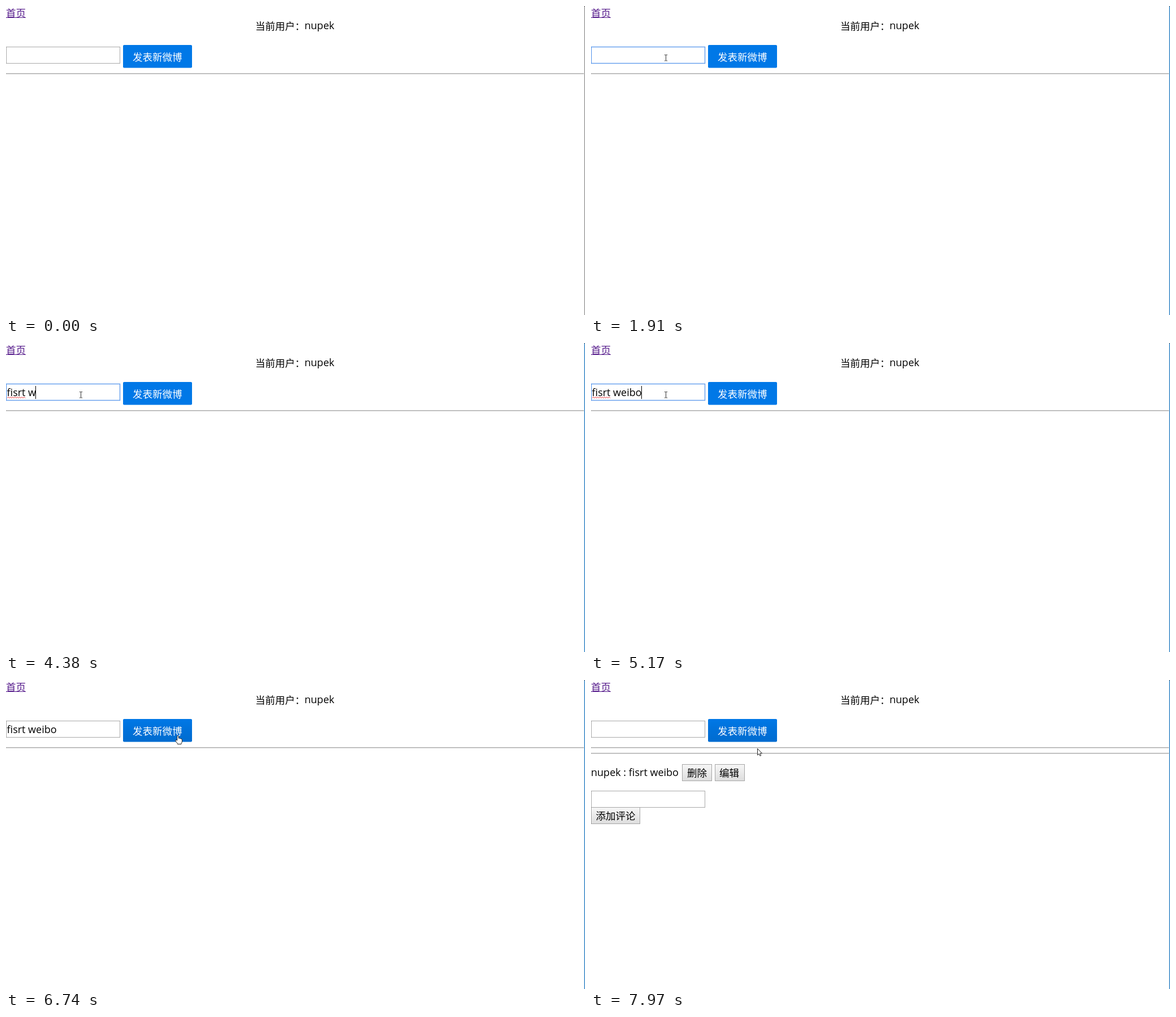
An HTML page with a canvas for the animation above (8000 ms loop, 1024 by 547 pixels).

```html
<!DOCTYPE html>
<html lang="zh-CN">
<head>
<meta charset="utf-8">
<style>
  html, body { margin: 0; width: 100%; height: 100%; overflow: hidden; background: #fff; }
  canvas { display: block; }
</style>
</head>
<body>
<canvas id="stage" width="1024" height="547"></canvas>
<script>
const ctx = document.getElementById('stage').getContext('2d');
const LOOP = 8000;
const LATIN = '18px "Open Sans", "Noto Sans", sans-serif';
const HAN = '17.5px "Noto Sans CJK SC", "Noto Sans CJK", sans-serif';
const USER = 'nupek';
const POST = 'fisrt weibo';

const FOCUS = 1370, PRESS = 6560, RELEASE = 6740, POSTED = 6880;

// [time, letters typed, caret x]
const KEYS = [
  [FOCUS, 0, 2], [2840, 1, 8], [2920, 2, 12], [3070, 3, 20], [3380, 4, 26.5],
  [3460, 5, 33], [3690, 6, 38], [4380, 7, 52], [4620, 8, 62], [4850, 9, 67],
  [5000, 10, 78], [5170, 11, 89]
];
const CARET_OFF = [[1910, 2460], [4240, 4380], [5720, 6220]];

function rect(x, y, w, h, fill) {
  ctx.fillStyle = fill;
  ctx.fillRect(x, y, w, h);
}

function text(str, x, y, font, fill = '#000') {
  ctx.font = font;
  ctx.fillStyle = fill;
  ctx.fillText(str, x, y);
}

function vertical(y, h, stops) {
  const g = ctx.createLinearGradient(0, y, 0, y + h);
  for (const [at, color] of stops) g.addColorStop(at, color);
  return g;
}

function frame(x, y, w, h, color, line = 1) {
  ctx.strokeStyle = color;
  ctx.lineWidth = line;
  ctx.strokeRect(x + 0.5, y + 0.5, w - 1, h - 1);
}

function rule(y) {
  rect(0, y, 1022, 1, '#a8a8a8');
  rect(0, y + 1, 1022, 1, '#dadada');
}

function greyButton(label, x, y, w, textX) {
  rect(x, y, w, 30, vertical(y, 30, [[0, '#f7f7f7'], [1, '#dddddd']]));
  frame(x, y, w, 30, '#a6a6a6');
  text(label, textX, y + 21.5, HAN);
}

function blueButton(t, hover) {
  ctx.beginPath();
  ctx.roundRect(207, 69, 122, 40.5, 2);
  ctx.fillStyle = '#0078e7';
  ctx.fill();
  if (hover) {
    ctx.fillStyle = vertical(69, 40.5,
      [[0, 'rgba(0,0,0,0)'], [0.4, 'rgba(0,0,0,.05)'], [1, 'rgba(0,0,0,.1)']]);
    ctx.fill();
  }
  if (t >= PRESS && t < RELEASE) {
    for (let i = 0; i < 4; i++) {
      frame(207 + i, 69 + i, 122 - 2 * i, 40.5 - 2 * i, `rgba(0,0,0,${0.2 / (i + 1)})`);
    }
  }
  text('发表新微博', 224, 96.5, HAN, '#fff');
}

function squiggle(x0, x1, y) {
  ctx.beginPath();
  for (let x = x0, i = 0; x <= x1; x += 2, i++) ctx.lineTo(x, y + (i % 2 ? -1 : 1));
  ctx.strokeStyle = '#e8262a';
  ctx.lineWidth = 1;
  ctx.stroke();
}

function inputBox(t) {
  const focused = t >= FOCUS && t < PRESS;
  if (focused) frame(0, 72, 202, 30, '#6aa2ee', 1.5);
  else frame(0, 72, 202, 30, '#a9a9a9');
  if (t < FOCUS || t >= POSTED) return;

  const [, count, caret] = KEYS.filter(k => t >= k[0]).pop();
  text(POST.slice(0, count), 1.5, 94, LATIN);
  if (!focused) return;
  if (count > 5) squiggle(2, 34, 96.5);
  if (!CARET_OFF.some(([a, b]) => t >= a && t < b)) rect(caret, 76, 1, 23, '#000');
}

function postList() {
  rule(129);
  text(USER + ' : ' + POST, 0, 170, LATIN);
  greyButton('删除', 161, 149, 53, 170);
  greyButton('编辑', 219, 149, 53, 227);
  frame(0, 196, 202, 30, '#a9a9a9');
  greyButton('添加评论', 0, 225, 87, 8.5);
}

function windowEdge(t) {
  const k = stepped(t, 1210, 1450, 3);
  const mix = (a, b) => `rgb(${a.map((v, i) => Math.round(v + (b[i] - v) * k)).join()})`;
  rect(1022, 0, 1, 547, mix([222, 222, 222], [176, 208, 234]));
  rect(1023, 0, 1, 547, mix([150, 150, 150], [45, 130, 195]));
  rect(1023, 0, 1, 1, '#222');
}

// Progress from 0 to 1 in n equal jumps
function stepped(t, from, to, n) {
  const s = Math.floor((t - from) / (to - from) * n + 1e-6);
  return Math.max(0, Math.min(n, s)) / n;
}

function pointer(t) {
  if (t < 340) return null;
  if (t < 1210) {
    const left = 1 - stepped(t, 340, 1120, 10);
    return { x: 131 + 756 * left ** 2.35, y: 92 + 444 * left ** 1.82, kind: 'arrow' };
  }
  if (t < 6030) return { x: 132, y: 91, kind: 'beam' };
  if (t < 7660) {
    const p = stepped(t, 5942, 6472, 6);
    const x = 132 + 172 * p * p * (3 - 2 * p);
    const kind = x < 202 ? 'beam' : x < 207 ? 'arrow' : 'hand';
    return { x, y: 91 + 7 * p, kind };
  }
  const p = stepped(t, 7582, 7970, 5);
  const y = 98 + 23 * p;
  return { x: 304 - 10 * p, y, kind: y < 109.5 ? 'hand' : 'arrow' };
}

const SHAPES = {
  arrow: new Path2D('M.5 .5V12L3.1 9.6L4.9 13.4L6.7 12.6L5 8.8H8.5Z'),
  hand: new Path2D('M-1.3 9V1.4Q0 -.4 1.3 1.4V5.2Q2.7 4.4 3.6 5.6Q5 5 5.7 6.3' +
    'Q7.3 6 7.4 7.6V11Q7.2 13 6 14.2V15.5H-.7V14.4L-4.3 9.8Q-4.4 7.7 -2.5 8.3Z'),
  beam: new Path2D('M-2.5 -5H-.5L0 -4.5L.5 -5H2.5M0 -4.5V4.5M-2.5 5.5H-.5L0 5L.5 5.5H2.5')
};

function drawPointer({ x, y, kind }) {
  ctx.save();
  ctx.translate(Math.round(x), Math.round(y));
  if (kind === 'beam') ctx.translate(0.5, 0.5);
  else {
    ctx.fillStyle = '#fff';
    ctx.fill(SHAPES[kind]);
  }
  ctx.strokeStyle = kind === 'beam' ? '#333' : '#222';
  ctx.lineWidth = 1;
  ctx.stroke(SHAPES[kind]);
  ctx.restore();
}

function draw(t) {
  const p = pointer(t);
  rect(0, 0, 1024, 547, '#fff');
  text('首页', 0, 18.5, HAN, '#551a8b');
  rect(0, 20, 35, 1, '#551a8b');
  text('当前用户：', 441, 41.5, HAN);
  text(USER, 528, 41, LATIN);
  inputBox(t);
  blueButton(t, t >= PRESS || p && p.kind === 'hand');
  rule(119);
  if (t >= POSTED) postList();
  windowEdge(t);
  if (p) drawPointer(p);
}

const start = performance.now();
function tick() {
  draw((performance.now() - start) % LOOP);
  requestAnimationFrame(tick);
}
tick();
</script>
</body>
</html>
```
